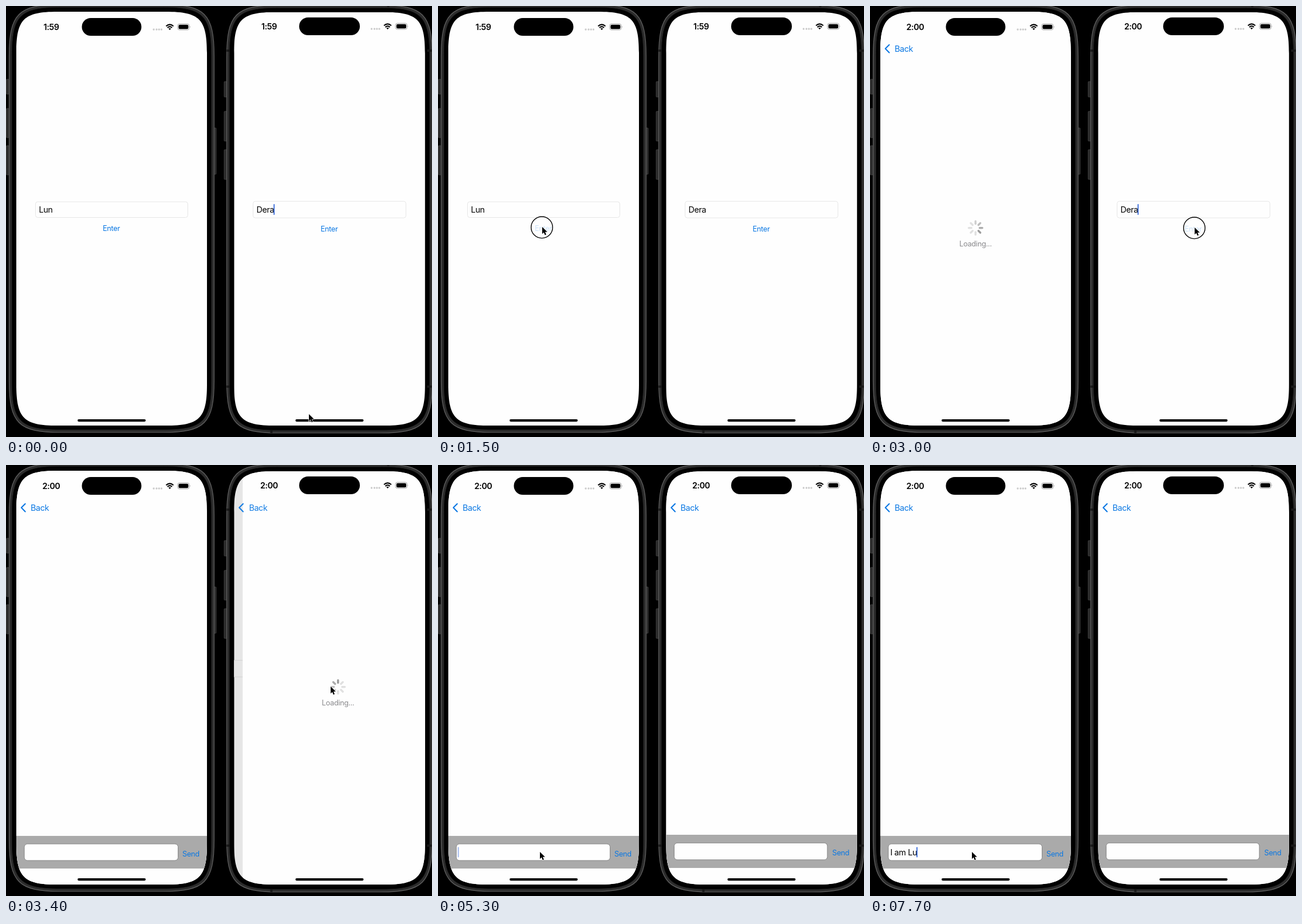
Animation, 744 px wide and 753 px high, one loop 8 s. Source, as an HTML page:

```html
<!DOCTYPE html>
<html lang="en">
<head>
<meta charset="utf-8">
<title>Chat on two phones</title>
<style>
  html, body { margin: 0; width: 100%; height: 100%; overflow: hidden; background: #000; }
  svg { display: block; width: 744px; height: 753px; }
  text { font: 14.4px Inter, "Noto Sans", sans-serif; letter-spacing: -.4px; white-space: pre; }
  .small { font-size: 12.8px; letter-spacing: -.3px; }
  .clock { font-weight: 600; }
  .mid { text-anchor: middle; }
  .blue { fill: #0b78e3; }
  .gray { fill: #8a8a8d; }
</style>
</head>
<body>
<svg id="stage" viewBox="0 0 744 753"></svg>
<script>
const LOOP = 8000;
const stage = document.getElementById('stage');

const phones = [
  { id: 'a', dx: 0, screen: [18, 10, 333, 723], island: [132.5, 21, 104, 31], status: 0,
    frame: [5.5, -2.5, 358, 747.5], buttons: [[128, 26], [179, 51], [244, 51]],
    name: 'Lun', field: [51.5, 342, 266, 27.5], enterY: 393,
    bar: [648, 57], input: [32, 662, 268.5, 29], sendY: 683.5,
    press: [1450, 1650], push: 1610, ready: 3100, spin: 5 },
  { id: 'b', dx: 380.5, screen: [17.8, 10.8, 333.6, 722.2], island: [131.5, 20, 106, 31], status: -1,
    frame: [5, -1.5, 359, 747.5], buttons: [[132, 27], [184, 52], [251, 52]],
    name: 'Dera', field: [51, 341.2, 267, 29], enterY: 394,
    bar: [646, 58], input: [32, 660.3, 267.5, 29.5], sendY: 682,
    press: [2950, 3080], push: 3070, ready: 4400, spin: 6 },
];

// Cursor tip: time, x, y
const path = [
  [50, 529, 713], [900, 554, 394], [1000, 555, 395], [1100, 174, 395], [1300, 182, 386],
  [1650, 182, 386], [2000, 314, 385], [2400, 567, 387], [3450, 567, 387], [4300, 178, 676],
];
const typing = [[5850, 'I'], [6250, 'I '], [6650, 'I a'], [6750, 'I am'],
  [7050, 'I am '], [7450, 'I am L'], [7650, 'I am Lu']];

const clamp = v => Math.max(0, Math.min(1, v));
const rect = ([x, y, w, h], r, attrs) =>
  `<rect x="${x}" y="${y}" width="${w}" height="${h}" rx="${r}" ${attrs}/>`;
const label = (x, y, str, cls = '', attrs = '') =>
  `<text x="${x}" y="${y}" class="${cls}" ${attrs}>${str}</text>`;
const inset = ([x, y, w, h], d) => [x + d, y + d, w - 2 * d, h - 2 * d];

// Rounded box whose corners ease into the straight sides
function smoothBox([x, y, w, h], r, attrs) {
  const e = 1.528 * r, c = 0.272 * r;
  return `<path d="M${x} ${y + e}c0 ${c - e} ${c} ${-e} ${e} ${-e}h${w - 2 * e}
    c${e - c} 0 ${e} ${c} ${e} ${e}v${h - 2 * e}c0 ${e - c} ${-c} ${e} ${-e} ${e}
    h${2 * e - w}c${c - e} 0 ${-e} ${-c} ${-e} ${-e}Z" ${attrs}/>`;
}

// Visible, then a short fade out and back in once a second
function blink(t) {
  const u = ((t % 1000) + 1000) % 1000;
  return 1 - clamp((u - 250) / 100) + clamp((u - 550) / 100);
}

function cursorAt(t) {
  const i = path.findIndex(k => k[0] > t);
  if (i === 0) return path[0].slice(1);
  if (i < 0) return path[path.length - 1].slice(1);
  const [a, b] = [path[i - 1], path[i]];
  let u = (t - a[0]) / (b[0] - a[0]);
  if (b[0] - a[0] > 500) u = u * u * (3 - 2 * u);
  return [a[1] + (b[1] - a[1]) * u, a[2] + (b[2] - a[2]) * u];
}

const caret = (id, y, h, opacity) =>
  rect([0, y, 1.7, h], 0.8, `id="${id}" fill="#2c62d8" opacity="${opacity}"`);

function statusBar(p, t) {
  const dots = [258, 263, 267.3, 271.5].map(x => `<circle cx="${x}" cy="41" r="1.7" fill="#cbcbcb"/>`).join('');
  return rect(p.island, 15.5, '') + `<g transform="translate(0 ${p.status})">
    ${label(79, 42, t < 2450 ? '1:59' : '2:00', 'clock mid')}${dots}
    <g fill="none" stroke="#000" stroke-width="2.1">
      <path d="M279.6 35.2Q286 29.4 292.4 35.2M282 38Q286 34.4 290 38"/></g>
    <path d="M283.7 39.6Q286 37.8 288.3 39.6L286 42Z"/>
    ${rect([299.7, 31.2, 20.4, 10.6], 3.4, 'fill="none" stroke="#999" stroke-width=".9"')}
    ${rect([301.3, 32.7, 17.2, 7.6], 2.2, '')}
    <path d="M321.2 34.8q1.5 1.7 0 3.4Z" fill="#999"/></g>`;
}

function spinner(p, t) {
  const head = Math.floor(t / 100 + p.spin + 1e-6);
  const tones = [155, 172, 190, 207, 224];
  let out = '';
  for (let i = 0; i < 8; i++) {
    const tone = tones[Math.min(4, (head - i) % 8)];
    out += `<path d="M0-7.2V-11.8" transform="rotate(${i * 45})" stroke="rgb(${tone},${tone},${tone})"/>`;
  }
  return `<g transform="translate(184.3 387.7)" stroke-width="3.5" stroke-linecap="round">${out}</g>` +
    label(184.3, 420, 'Loading...', 'small mid gray');
}

function entryPage(p, t) {
  const pressed = t >= p.press[0] && t < p.press[1];
  return rect(p.field, 4, 'fill="#fefefe" stroke="#e6e6e6"') +
    label(p.field[0] + 6, 361, p.name, '', `id="name-${p.id}"`) +
    (p.id === 'b' ? caret('nameCaret', 346, 19, blink(t - 1100)) : '') +
    label(184, p.enterY, 'Enter', 'small mid blue', `opacity="${pressed ? 0.2 : 1}"`);
}

function chatPage(p, t) {
  const step = typing.filter(k => k[0] <= t).pop();
  const [sx, , sw] = p.screen;
  let out = rect([sx, p.bar[0], sw, p.bar[1]], 0, 'fill="#aaa"') +
    rect(p.input, 5.5, 'fill="#fefefe" stroke="#858585"') +
    label(308, p.sendY, 'Send', 'small blue');
  if (p.id === 'a') {
    out += label(35.5, 682, step ? step[1] : '', '', 'id="draft"');
    if (t >= 4650) out += caret('draftCaret', 667.5, 18, step ? 1 : blink(t - 5000));
  }
  return out;
}

function screenContent(p, t) {
  if (t < p.push) return entryPage(p, t);
  const w = p.screen[2];
  const s = (t - p.push) * 0.0147;
  const left = (1 + s) * Math.exp(-s);
  const dx = w * left;
  const shown = 1 - left;
  const under = left > 0.002
    ? `<g transform="translate(${-0.3 * w * shown})">${entryPage(p, t)}</g>` +
      rect(p.screen, 0, `opacity="${0.1 * shown}"`) : '';
  return under + `<g transform="translate(${dx < 0.3 ? 0 : dx})">${rect(p.screen, 0, 'fill="#fefefe"')}
      ${t < p.ready ? spinner(p, t) : chatPage(p, t)}</g>
    <g opacity="${shown}"><path d="M33.6 67.8L26.8 74.6L33.6 81.4" fill="none" stroke="#0b78e3"
      stroke-width="2.1" stroke-linecap="round" stroke-linejoin="round"/>
    ${label(43 + dx * 0.06, 79.7, 'Back', 'blue')}</g>`;
}

function phone(p, t) {
  const metal = 'fill="#2b2b2b" stroke="#484848" stroke-width=".8"';
  const side = p.buttons.map(([y, h]) => rect([0.5, y, 5, h], 1, metal)).join('');
  const power = p.id === 'a' ? rect([362.5, 213, 4.5, 81], 1, metal) : '';
  const seams = p.id === 'b'
    ? [[5, 76, 5, 4], [5, 663, 5, 4], [355, 76, 8, 4], [355, 663, 8, 4], [81, 741, 4, 5], [285, -1, 4, 3]]
      .map(r => rect(r, 0, 'fill="#171717"')).join('') : '';
  return `<g transform="translate(${p.dx})">${side}${power}
    ${smoothBox(p.frame, 59, 'fill="#2c2c2c" stroke="#626262" stroke-width="1.2"')}
    ${smoothBox(inset(p.frame, 4.8), 54.5, 'fill="#000" stroke="#161616"')}${seams}
    <clipPath id="clip-${p.id}">${smoothBox(p.screen, 47, '')}</clipPath>
    <g clip-path="url(#clip-${p.id})">${rect(p.screen, 0, 'fill="#fefefe"')}${screenContent(p, t)}</g>
    ${statusBar(p, t)}${rect([125, 722, 119, 4.2], 2.1, '')}</g>`;
}

function pointer(t) {
  const [x, y] = cursorAt(t);
  const pressing = phones.some(p => t >= p.press[0] && t < p.press[1]);
  return (pressing ? `<circle cx="${x - 0.6}" cy="${y + 0.8}" r="18.8" fill="none" stroke="#000" stroke-width="1.4"/>` : '') +
    `<path transform="translate(${x} ${y})" d="M0 0V12.2L2.8 9.6L4.8 14.2L7 13.2L5 8.8H8.9Z"
      stroke="#fff" stroke-width="1.4" paint-order="stroke" stroke-linejoin="round"/>`;
}

function placeCaret(caretId, textId) {
  const mark = document.getElementById(caretId);
  if (!mark) return;
  const text = document.getElementById(textId);
  mark.setAttribute('x', +text.getAttribute('x') - 0.8 + (text.textContent ? text.getComputedTextLength() : 0));
}

function draw(now) {
  const t = now % LOOP;
  stage.innerHTML = phones.map(p => phone(p, t)).join('') + pointer(t);
  placeCaret('nameCaret', 'name-b');
  placeCaret('draftCaret', 'draft');
}

let start;
function tick() {
  const now = performance.now();
  start ??= now;
  draw(now - start);
  requestAnimationFrame(tick);
}
tick();
</script>
</body>
</html>
```
